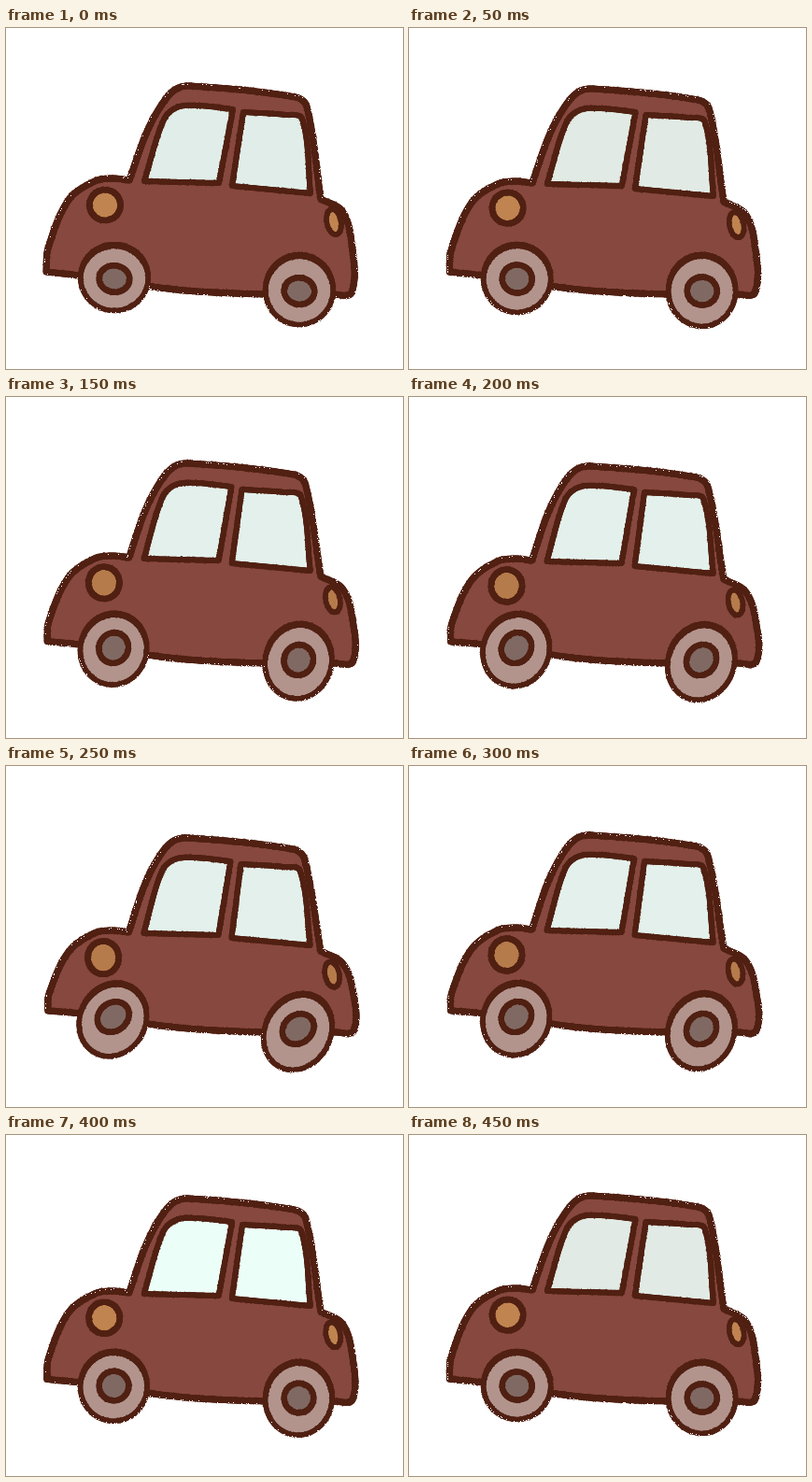
Recreate the animation shown at these times as an HTML page with a canvas. Size 425x365 px, loop 0.5 s.

```html
<!DOCTYPE html>
<html lang="en">
<head>
<meta charset="utf-8">
<title>Bouncing car</title>
<style>
html, body { margin: 0; width: 100%; height: 100%; overflow: hidden; background: #fff; }
canvas { display: block; width: 425px; height: 365px; }
</style>
</head>
<body>
<canvas id="stage" width="425" height="365"></canvas>
<script>
const W = 425, H = 365, STEP = 50, POSES = 6;
const INK = '#512113', PAINT = '#87483f', TYRE = '#b2948d', HUB = '#806963';
const GLASS = ['#e0ede8', '#e1eae4', '#ebfff8', '#e3f0eb'];

// Key points at rest; a trailing 1 marks a sharp corner.
const body = [
  [43, 261, 1], [45, 236], [67, 184], [95, 164], [114, 161], [132, 163, 1],
  [150, 113], [166, 83], [181, 66], [197, 62], [310, 74], [322, 84], [337, 183, 1],
  [360, 196], [370, 230], [370, 283], [350, 285], [278, 285], [205, 282], [157, 277], [78, 265]
];
const frontPane = [[148, 164, 1], [169, 98], [183, 85], [205, 83], [243, 87, 1], [228, 166, 1]];
const rearPane = [[254, 90, 1], [300, 93], [317, 97], [326, 177, 1], [242, 169, 1]];

const mix = (a, b, t) => a + (b - a) * t;
const clamp = v => Math.max(0, Math.min(1, v));

function randomizer(seed) {
  return () => {
    seed = (seed * 1664525 + 1013904223) >>> 0;
    return seed / 4294967296;
  };
}

// The cabin sinks and leans forward while the sills stay put.
const squash = (pts, s) => pts.map(([x, y, corner]) =>
  [x + s * (y - 190) / 50, y + 12 * s * clamp((265 - y) / 58), corner]);

// Closed Hermite curve, sampled about once per pixel.
function curve(pts) {
  const n = pts.length, out = [];
  const at = i => pts[(i + n) % n];
  const tangent = (i, chord, len) => {
    if (at(i)[2]) return chord;
    const dx = at(i + 1)[0] - at(i - 1)[0], dy = at(i + 1)[1] - at(i - 1)[1];
    const scale = len / Math.hypot(dx, dy);
    return [dx * scale, dy * scale];
  };
  for (let i = 0; i < n; i++) {
    const p = at(i), q = at(i + 1), chord = [q[0] - p[0], q[1] - p[1]];
    const len = Math.hypot(...chord), count = Math.ceil(len);
    const u = tangent(i, chord, len), v = tangent(i + 1, chord, len);
    for (let j = 0; j < count; j++) {
      const t = j / count, r = 1 - t, ease = t * t * (3 - 2 * t);
      out.push([0, 1].map(k => mix(p[k], q[k], ease) + t * r * (r * u[k] - t * v[k])));
    }
  }
  return out;
}

function oval(x, y, rx, ry, tilt = 0) {
  const count = Math.ceil(Math.PI * (rx + ry)), cos = Math.cos(tilt), sin = Math.sin(tilt);
  return Array.from({ length: count }, (_, i) => {
    const a = i / count * 2 * Math.PI, u = rx * Math.cos(a), v = ry * Math.sin(a);
    return [x + u * cos - v * sin, y + u * sin + v * cos];
  });
}

function drawPose(index) {
  const canvas = document.createElement('canvas');
  canvas.width = W;
  canvas.height = H;
  const g = canvas.getContext('2d'), rand = randomizer(index * 977 + 31);
  const s = index / 4, tilt = .5 * Math.max(0, s - .25);
  const glass = GLASS[Math.min(index, 3)], lamp = s < .6 ? '#c08450' : '#b67b4b';

  const dot = (x, y, r) => {
    g.beginPath();
    g.arc(x, y, r, 0, 2 * Math.PI);
    g.fill();
  };

  // Fill a shape and edge it with a crumbly crayon line.
  function crayon(pts, fill, widthAt, speckAt = () => false) {
    g.fillStyle = fill;
    g.beginPath();
    pts.forEach(p => g.lineTo(...p));
    g.fill();
    const specks = [];
    g.fillStyle = INK;
    pts.forEach((p, i) => {
      const q = pts[(i + 1) % pts.length], half = widthAt(p) / 2;
      const len = Math.hypot(q[0] - p[0], q[1] - p[1]) || 1;
      const nx = (q[1] - p[1]) / len, ny = (p[0] - q[0]) / len;
      dot(...p, half);
      const side = rand() < .5 ? -half : half;
      if (rand() < .4) dot(p[0] + nx * side, p[1] + ny * side, .4 + rand() * .5);
      if (speckAt(p) && rand() < .13) {
        const inset = half - .4 - rand();
        specks.push([p[0] + nx * inset, p[1] + ny * inset]);
      }
    });
    g.fillStyle = '#fff';
    specks.forEach(([x, y]) => g.fillRect(Math.round(x), Math.round(y), 1, 1));
  }

  const line = width => () => width;
  crayon(curve(squash(body, s)), PAINT, line(7), () => true);
  crayon(curve(squash(frontPane, s)), glass, line(6));
  crayon(curve(squash(rearPane, s)), glass, line(6));

  const drop = 12.5 * s;
  crayon(oval(106 - 1.5 * s, 189.5 + drop, 16.6, 16.4 + s), lamp, line(6.4));
  crayon(oval(351 - 1.5 * s, 207.5 + drop, 7.6, 13.8, -.2), lamp, line(5.4));

  function wheel(x, y, rx, ry) {
    const rim = ([, py]) => 5.4 + 1.8 * clamp((y - py) / ry);
    crayon(oval(x - 1.3 * s, y + 3.5 * s, rx - s, ry + 4 * s, tilt), TYRE, rim, p => p[1] > y + 6);
    crayon(oval(x - s, y + 1, 16.3 - s, 14.3 + 3 * s, .1 + 1.6 * tilt), HUB, line(6.2));
  }
  wheel(116, 267.5, 36.2, 35);
  wheel(314, 280.5, 36.2, 37);
  return canvas;
}

const drawings = Array.from({ length: POSES }, (_, i) => drawPose(i));
const ctx = document.getElementById('stage').getContext('2d');
const period = 2 * (POSES - 1);
const start = performance.now();

// Play the drawings there and back again.
function render() {
  const beat = Math.floor((performance.now() - start) / STEP) % period;
  ctx.fillStyle = '#fff';
  ctx.fillRect(0, 0, W, H);
  ctx.drawImage(drawings[Math.min(beat, period - beat)], 0, 0);
  requestAnimationFrame(render);
}
render();
</script>
</body>
</html>
```
